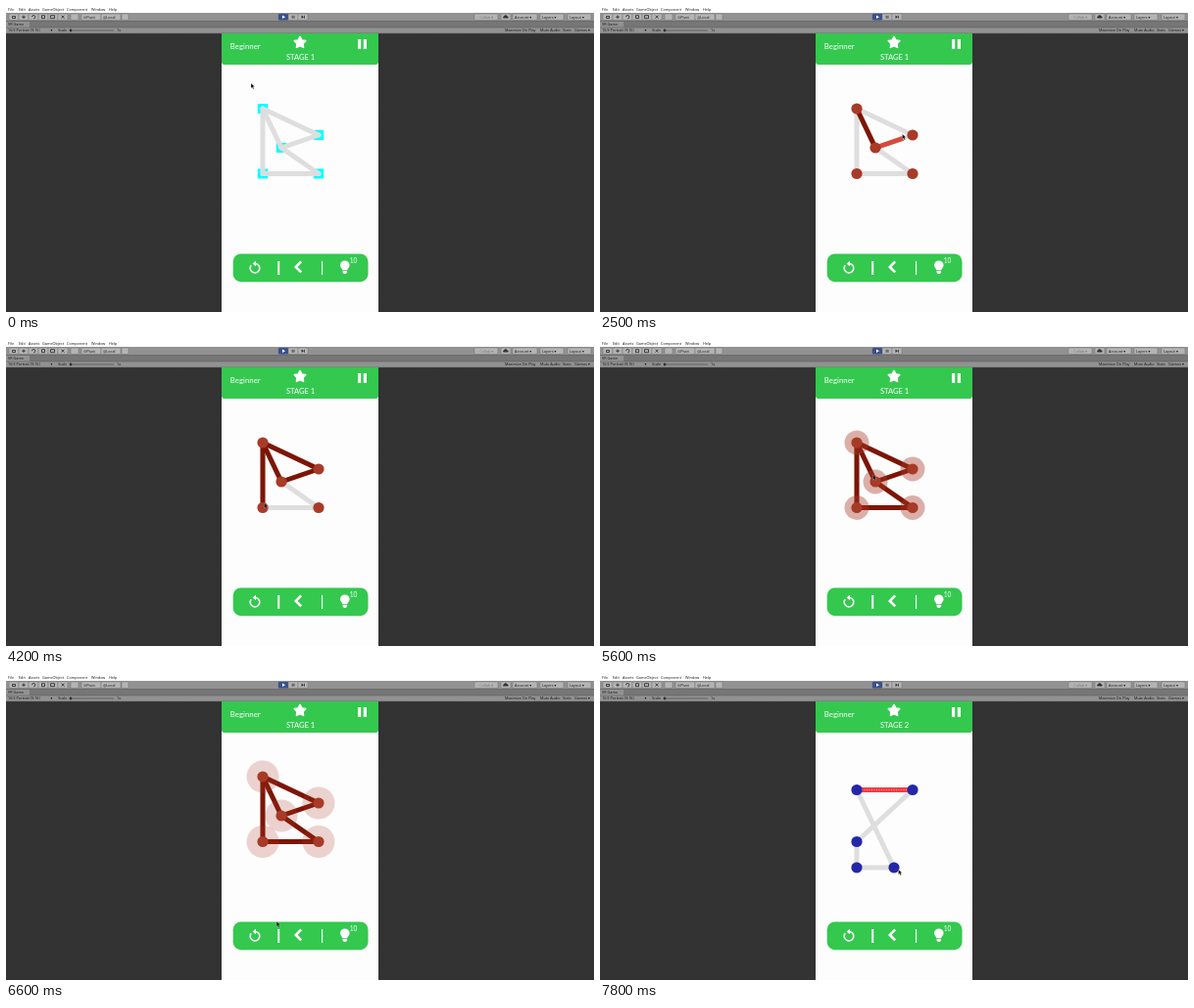
An HTML page that plays this animation: 600 by 313 pixels, repeating every 8 s.

```html
<!DOCTYPE html>
<html lang="en">
<head>
<meta charset="utf-8">
<title>One-line puzzle</title>
<style>
html, body { margin: 0; width: 100%; height: 100%; overflow: hidden; background: #313131; }
svg { display: block; width: 100%; height: 100%; }
.ui { font: 3.8px "Open Sans", sans-serif; fill: #111; }
.game { font-family: Lato, sans-serif; fill: #fff; }
.btn { fill: #b4b4b4; stroke: #666; stroke-width: .4; }
.icon { fill: none; stroke: #fff; }
</style>
</head>
<body>
<svg viewBox="0 0 600 313">
  <defs>
    <pattern id="weave" width="2" height="2" patternUnits="userSpaceOnUse">
      <rect width="2" height="2" fill="#313131"/>
      <path d="M0 0h1v1H0zM1 1h1v1H1z" fill="#343434"/>
    </pattern>
    <clipPath id="view"><rect x="220" y="28" width="160" height="285"/></clipPath>
  </defs>
  <rect width="600" height="313" fill="url(#weave)"/>

  <g id="editor" class="ui">
    <rect width="600" height="7" fill="#fff"/>
    <rect y="7" width="600" height="8.5" fill="#929292"/>
    <rect y="15.5" width="600" height="6.5" fill="#767676"/>
    <rect y="16" width="24" height="6" fill="#929292"/>
    <rect y="22" width="600" height="6" fill="#929292"/>
    <path d="M0 22H600M0 28H600" stroke="#555" stroke-width=".5"/>
    <path d="M65 25H110" stroke="#555" stroke-width=".8"/>
    <circle cx="66" cy="25" r="1.4" fill="#333"/>
  </g>

  <g clip-path="url(#view)" class="game">
    <rect x="220" y="28" width="160" height="285" fill="#fdfdfd"/>
    <path d="M220 28h160v29q0 3-3 3h-154q-3 0-3-3z" fill="#34c84f"/>
    <text x="228.7" y="44.2" font-size="7.9">Beginner</text>
    <text id="stage" x="300.6" y="55.2" font-size="7.6" text-anchor="middle"></text>
    <path id="badge" stroke="#fff" stroke-width="1.6" stroke-linejoin="round"/>
    <path d="M359 34h3.2v10H359zM364.8 34h3.2v10h-3.2z"/>

    <g id="board"></g>

    <rect x="231.7" y="253.5" width="137.8" height="28.7" rx="8" fill="#34c84f"/>
    <path class="icon" d="M250.2 265.2A4.8 4.8 0 1 0 254.5 263.4" stroke-width="1.5"/>
    <path d="M255 260.8v5.4l-3.4-2.7z"/>
    <path class="icon" d="M278.2 261v14" stroke-width="2"/>
    <path class="icon" d="M322.6 261v14" stroke-width="1.1"/>
    <path class="icon" d="M301.2 261.4l-5.4 5.5 5.4 5.5" stroke-width="2.6"/>
    <path d="M343.4 270.2c0-1.6-2.4-2.6-2.4-5a4.8 4.8 0 0 1 9.6 0c0 2.400-2.400 3.400-2.400 5zM343.500 271h4.600v1.600l-1.300 1.300h-2l-1.300-1.300z"/>
    <text x="350.7" y="263" font-size="6.6">10</text>

    <g id="popup">
      <rect x="220" y="28" width="160" height="285" fill="#000" opacity=".6"/>
      <rect x="238" y="110.300" width="124" height="120.700" fill="#fff"/>
      <path id="hero" fill="#fbc94d" stroke="#a84a43" stroke-width="5" stroke-linejoin="round"/>
      <path id="heroFill" fill="#fbc94d" stroke="#fbc94d" stroke-width="2" stroke-linejoin="round"/>
      <path id="heroLight" fill="#fde25a"/>
      <g fill="#5b2f33">
        <circle cx="297.500" cy="131.500" r="1.500"/>
        <circle cx="309" cy="131.500" r="1.500"/>
        <path d="M299 135h8.600a4.300 5 0 0 1-8.600 0z" fill="#a02c34"/>
      </g>
      <g fill="#f48a62">
        <circle cx="295" cy="135.500" r="1.600"/>
        <circle cx="311.500" cy="135.500" r="1.600"/>
      </g>
      <text x="303.200" y="167.700" font-size="12.800" text-anchor="middle" fill="#e01822">FANTASTIC!</text>
      <rect x="250" y="194.700" width="100" height="21.600" rx="4.500" fill="#5dcb6d"/>
      <text x="299.800" y="208.800" font-size="8.900" text-anchor="middle">Next</text>
    </g>
  </g>
  <path id="cursor" d="M0 0v5l1.200-1 .9 2 .9-.4-.9-2h1.600z" fill="#000" stroke="#fff" stroke-width=".25"/>
</svg>
<script>
const LOOP = 8000, LOADED = 300, WON = 5220, POPUP = 6700, NEXT = 7500, PULSE = 764;
const $ = id => document.getElementById(id);

function add(parent, tag, attrs, text) {
  const el = document.createElementNS("http://www.w3.org/2000/svg", tag);
  for (const k in attrs) el.setAttribute(k, attrs[k]);
  if (text) el.textContent = text;
  parent.append(el);
  return el;
}

// Editor chrome
const editor = $("editor");
const label = (x, y, s, fill = "#111") => add(editor, "text", { x, y, fill }, s);
const button = (x, w, s, fill = "#111") => {
  add(editor, "rect", { x, y: 8, width: w, height: 6.4, rx: 1, class: "btn" });
  if (s) label(x + 2, 12.6, s, fill);
};
[[2, "File"], [13, "Edit"], [23, "Assets"], [37, "GameObject"], [62, "Component"], [87, "Window"], [105, "Help"]]
  .forEach(([x, s]) => label(x, 4.6, s));
[[2, 20.2, "VR Game"], [2, 26.3, "16:9 Portrait (9:16)"], [45.500, 26.3, "▾"], [53, 26.3, "Scale"], [113, 26.3, "1x"],
 [509, 26.3, "Maximize On Play"], [545, 26.3, "Mute Audio"], [568, 26.3, "Stats"], [580, 26.3, "Gizmos ▾"]]
  .forEach(a => label(...a));
for (let i = 0; i < 6; i++) button(3 + i * 10, 10);
add(editor, "path", {
  d: "M6.500 12.500v-2h3v2zM18 9.500v3.500M16.200 11.200h3.600M26.500 11.200a1.700 1.700 0 1 1 1.700 1.700M36.500 9.700h3v3h-3zM45.500 9.700h4v3h-4zM56.500 9.700l3 3M59.500 9.700l-3 3",
  fill: "none", stroke: "#222", "stroke-width": .8
});
button(66, 8); button(77, 20, "⊙Pivot"); button(97, 20, "◎Local"); button(118, 7);
[278, 288, 298].forEach(x => button(x, 10));
add(editor, "rect", { x: 278, y: 8, width: 10, height: 6.4, rx: 1, fill: "#39518c" });
add(editor, "path", { d: "M282 9.500l3 1.700-3 1.700z", fill: "#fff" });
add(editor, "path", { d: "M291.700 9.700h.9v3h-.9zM293.500 9.700h.9v3h-.9zM301.500 9.500l2.500 1.700-2.500 1.700zM304.200 9.700h.8v3h-.8z", fill: "#333" });
button(478, 24, "◌ Collab ▾", "#777"); button(505, 10);
add(editor, "path", { d: "M507.500 12.500a1.200 1.200 0 0 1 .6-2 1.800 1.800 0 0 1 3.400 0 1.100 1.100 0 0 1 .7 2z", fill: "#333" });
button(517, 25, "Account ▾"); button(545, 24, "Layers  ▾"); button(573, 24, "Layout  ▾");

// Stars
const star = (cx, cy, r, k, n = 10) => "M" + Array.from({ length: n }, (_, i) => {
  const a = i * Math.PI / 5 - Math.PI / 2, q = i % 2 ? r * k : r;
  return [cx + q * Math.cos(a), cy + q * Math.sin(a)].map(v => v.toFixed(2));
}).join("L") + "Z";
$("badge").setAttribute("d", star(300, 37.5, 6, .53));
$("hero").setAttribute("d", star(303.2, 134, 15.5, .6));
$("heroFill").setAttribute("d", star(303.2, 134, 15.5, .6));
$("heroLight").setAttribute("d", star(303.2, 134, 15, .6, 6));

// Puzzle boards
const A = [262, 105], B = [319, 132], C = [281, 145], D = [262, 171.500], E = [319, 171.500];
const P = [262, 118.500], Q = [319, 118.500], R = D, S = [262, 198], T = [300, 198];
const moves = [[A, C, 1000, 1850], [C, B, 1900, 2710], [B, A, 2800, 3400],
               [A, D, 3600, 4150], [D, E, 4250, 4440], [E, C, 4800, 5150]];
const board = $("board"), one = add(board, "g", {}), two = add(board, "g", {});

const line = (g, [x1, y1], [x2, y2], stroke, width = 5) =>
  add(g, "line", { x1, y1, x2, y2, stroke, "stroke-width": width });
const dot = (g, [cx, cy], r, fill) => add(g, "circle", { cx, cy, r, fill });

const squares = add(one, "g", { fill: "#0ff" });
const nodes1 = [A, B, C, D, E];
nodes1.forEach(([x, y]) => add(squares, "rect", { x: x - 5.2, y: y - 5, width: 10.4, height: 10 }));
moves.forEach(([a, b]) => line(one, a, b, "#dedede").setAttribute("stroke-linecap", "round"));
const drawn = moves.map(([a, b]) => line(one, a, b, "#7d1505"));
const rings = nodes1.map(p => dot(one, p, 6, "#a83a28"));
const dots = add(one, "g", {});
nodes1.forEach(p => dot(dots, p, 5.6, "#a83a28"));

[[Q, R], [R, S], [S, T], [T, P]].forEach(([a, b]) => line(two, a, b, "#dedede"));
line(two, P, Q, "#f23b40");
line(two, P, Q, "#ff8b8b", 1.4).setAttribute("stroke-dasharray", "1 1.5");
[P, Q, R, S, T].forEach(p => dot(two, p, 5.6, "#2427a8"));

// Pointer: time, x, y
const path = [[0, 250, 79], [100, 250, 79], [900, 261, 103], [1000, 262, 104], [1850, 281, 137], [1900, 281, 138],
  [2500, 308.500, 131], [2710, 319, 128], [2800, 319, 128], [3400, 262, 99], [3600, 262, 99], [4150, 263, 167],
  [4250, 264, 167], [4440, 316, 168], [4500, 333, 168], [4800, 333, 168], [5150, 281, 139], [5600, 278.500, 138],
  [5800, 278, 139], [6500, 276, 252], [6600, 276, 253.500], [7000, 333.500, 118.500], [7150, 383, 140],
  [7400, 306, 205], [7500, 305, 204], [7800, 304.500, 200], [LOOP, 304.500, 200]];

const clamp = v => Math.max(0, Math.min(1, v));
const mix = (a, b, k) => a + (b - a) * k;
const show = (el, on) => el.style.display = on ? "" : "none";

function render(t) {
  const i = path.findIndex(p => p[0] > t), [t0, x0, y0] = path[i - 1], [t1, x1, y1] = path[i];
  const k = (t - t0) / (t1 - t0);
  $("cursor").setAttribute("transform", `translate(${mix(x0, x1, k)} ${mix(y0, y1, k)})`);

  const second = t >= NEXT;
  show(one, !second);
  show(two, second);
  show(squares, t < LOADED);
  show(dots, t >= LOADED);
  show($("popup"), t >= POPUP && !second);
  $("stage").textContent = second ? "STAGE 2" : "STAGE 1";

  moves.forEach(([a, b, start, end], n) => {
    const p = clamp((t - start) / (end - start)), el = drawn[n];
    show(el, p > 0);
    el.setAttribute("x2", mix(a[0], b[0], p));
    el.setAttribute("y2", mix(a[1], b[1], p));
    el.setAttribute("stroke", p < 1 ? "#d94a38" : "#7d1505");
  });

  const r = 6 + 13 * ((t - WON) / PULSE % 1);
  rings.forEach(el => {
    show(el, t >= WON);
    el.setAttribute("r", Math.max(0, r));
    el.setAttribute("opacity", clamp(.4 - .045 * (r - 12.5)));
  });
}

function tick() {
  render(performance.now() % LOOP);
  requestAnimationFrame(tick);
}
tick();
</script>
</body>
</html>
```
